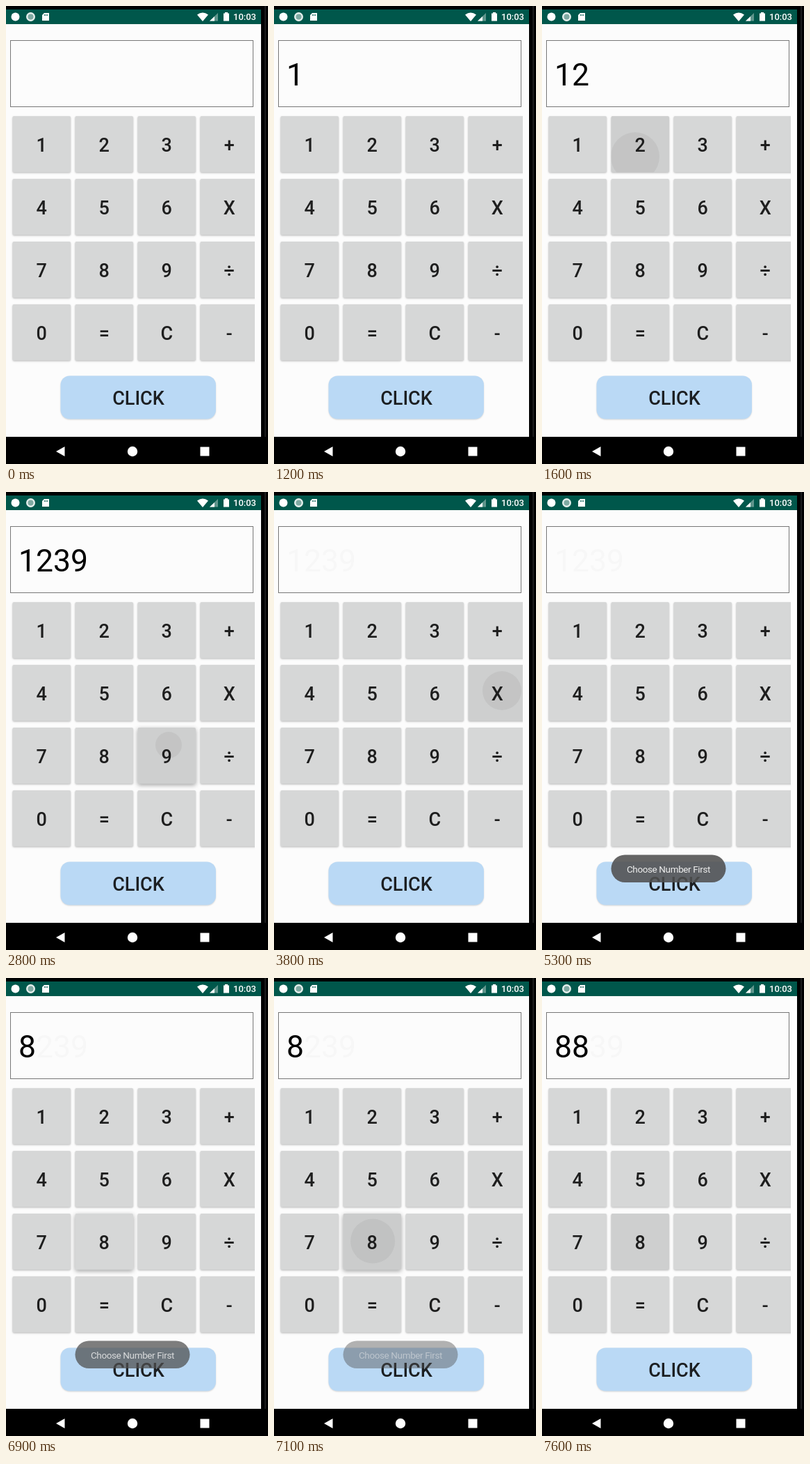
Recreate the animation shown at these times as an HTML page with a canvas. Size 377 by 657 pixels, loop 8000 ms.

```html
<!DOCTYPE html>
<html lang="en">
<head>
<meta charset="utf-8">
<title>Calculator</title>
<style>
  html, body { margin: 0; width: 100%; height: 100%; overflow: hidden; background: #000; }
  canvas { display: block; }
</style>
</head>
<body>
<canvas id="stage" width="377" height="657"></canvas>
<script>
const ctx = document.getElementById('stage').getContext('2d');
const LOOP = 8000, STEP = 100;
const KEYS = '123+456X789÷0=C-';

// Text on the display from each time on
const DISPLAY = [[0, ''], [1200, '1'], [1500, '12'], [1900, '123'], [2700, '1239'],
  [3700, ''], [6900, '8'], [7300, '88']];

// Key presses: touch point, first ripple radius, number of drawn steps, raised or not
const PRESSES = [
  { key: '1', from: 1200, to: 1500, x: 73, y: 206, r: 30, steps: 1 },
  { key: '2', from: 1500, to: 1900, x: 134, y: 216, r: 35, steps: 1 },
  { key: '3', from: 1900, to: 2200, x: 230, y: 198, r: 35, steps: 1 },
  { key: '9', from: 2700, to: 3100, x: 234, y: 363, r: 19, steps: 2, raised: true },
  { key: 'X', from: 3700, to: 4100, x: 328, y: 285, r: 28, steps: 1 },
  { key: '÷', from: 4700, to: 5200, x: 321, y: 379, r: 19, steps: 4, raised: true },
  { key: '8', from: 6900, to: 7300, x: 143, y: 376, r: 20, steps: 3, raised: true },
  { key: '8', from: 7300, to: 8000, x: 141, y: 379, r: 60, steps: 1 }
];

const clamp = v => Math.max(0, Math.min(1, v));

function rect(x, y, w, h, color) {
  ctx.fillStyle = color;
  ctx.fillRect(x, y, w, h);
}

function round(x, y, w, h, r, color) {
  ctx.fillStyle = color;
  ctx.beginPath();
  ctx.roundRect(x, y, w, h, r);
  ctx.fill();
}

function disc(x, y, r, color) {
  ctx.fillStyle = color;
  ctx.beginPath();
  ctx.arc(x, y, r, 0, Math.PI * 2);
  ctx.fill();
}

function shape(path, color) {
  ctx.fillStyle = color;
  ctx.fill(new Path2D(path));
}

function label(text, x, y, size, color, weight = 400, align = 'center') {
  ctx.font = `${weight} ${size}px Roboto, sans-serif`;
  ctx.textAlign = align;
  ctx.fillStyle = color;
  ctx.fillText(text, x, y);
}

function shadow(color, blur, y) {
  ctx.shadowColor = color;
  ctx.shadowBlur = blur;
  ctx.shadowOffsetY = y;
}

function statusBar() {
  rect(0, 5, 367, 21, '#00574b');
  disc(13.5, 15.5, 6, '#fff');
  disc(35.5, 15.5, 6.5, '#e6efed');
  disc(35.5, 15.5, 4, '#7fa9a2');
  shape('M55 10H62V21H52V13Z', '#fff');
  rect(55, 12, 1, 2, '#00574b');
  rect(57, 12, 1, 2, '#00574b');
  rect(59, 12, 1, 2, '#00574b');
  shape('M275 12.5Q283 6.5 291 12.5L283 22Z', '#fff');
  shape('M305 10V21.5H293Z', '#5f958c');
  shape('M300 15V21.5H293Z', '#fff');
  shape('M315 9H319V10.5H321V21.5H313V10.5H315Z', '#fff');
  label('10:03', 327, 20, 13, '#fff', 500, 'left');
}

function navBar() {
  rect(0, 618, 377, 39, '#000');
  shape('M72 639L84.5 632V646Z', '#fff');
  disc(182, 639, 7.2, '#fff');
  rect(279.5, 632.5, 13, 13, '#fff');
}

function key(name, i, t) {
  const x = 9.5 + i % 4 * 90, y = 158 + Math.floor(i / 4) * 90;
  const cx = x + 41.7, cy = y + 41;
  const press = PRESSES.find(p => p.key === name && t >= p.from && t < p.to);
  ctx.save();
  ctx.beginPath();
  ctx.rect(0, 0, 358, 657);
  ctx.clip();
  if (press && press.raised) shadow('rgba(0,0,0,.36)', 6, 2);
  else shadow('rgba(0,0,0,.26)', 2.5, 1);
  round(x, y, 83.5, 80.5, 2, '#d6d7d7');
  shadow('transparent', 0, 0);
  if (press) {
    const n = Math.min((t - press.from) / STEP, press.steps);
    ctx.beginPath();
    ctx.roundRect(x, y, 83.5, 80.5, 2);
    ctx.clip();
    rect(x, y, 84, 81, `rgba(0,0,0,${Math.min(0.05, n * 0.04)})`);
    if (n > 0 && press.r < 50) {
      const drift = 1 - 0.5 ** (n - 1);
      disc(press.x + (cx - press.x) * drift, press.y + (cy - press.y) * drift,
        press.r + 12 * (n - 1), 'rgba(0,0,0,.05)');
    }
  }
  label(name, cx, cy + 10, 27, '#1e1e1e', 500);
  ctx.restore();
}

function display(t) {
  ctx.strokeStyle = '#777';
  ctx.lineWidth = 1;
  ctx.strokeRect(6.5, 49.5, 349, 95);
  const text = DISPLAY.filter(d => t >= d[0]).pop()[1];
  // Cleared digits leave a faint trace
  if (t >= 3700) {
    [...'1239'].forEach((c, i) => {
      if (i >= text.length) label(c, 18 + i * 25, 114, 44.5, '#f7f7f7', 400, 'left');
    });
  }
  label(text, 18, 114, 44.5, '#000', 400, 'left');
}

function toast(t) {
  const alpha = t < 6900 ? clamp((t - 4900) / 400) : clamp((7400 - t) / 600);
  if (!alpha) return;
  ctx.save();
  ctx.globalAlpha = alpha;
  round(99.5, 520.5, 165, 39.5, 19.75, 'rgba(80,80,80,.88)');
  ctx.letterSpacing = '-0.38px';
  label('Choose Number First', 182, 546, 13.5, '#eee');
  ctx.restore();
}

function draw(t) {
  rect(0, 0, 377, 657, '#000');
  rect(372, 0, 2, 657, '#1c1c1c');
  rect(0, 26, 367, 592, '#fcfcfc');
  statusBar();
  navBar();
  display(t);
  [...KEYS].forEach((name, i) => key(name, i, t));
  shadow('rgba(0,0,0,.15)', 2, 1);
  round(78.5, 530.5, 223.5, 62, 13, '#bad9f5');
  shadow('transparent', 0, 0);
  label('CLICK', 190.5, 572, 27, '#1c1f22', 500);
  toast(t);
}

function frame() {
  const t = performance.now() % LOOP;
  draw(Math.floor(t / STEP) * STEP);
  requestAnimationFrame(frame);
}
frame();
</script>
</body>
</html>
```
